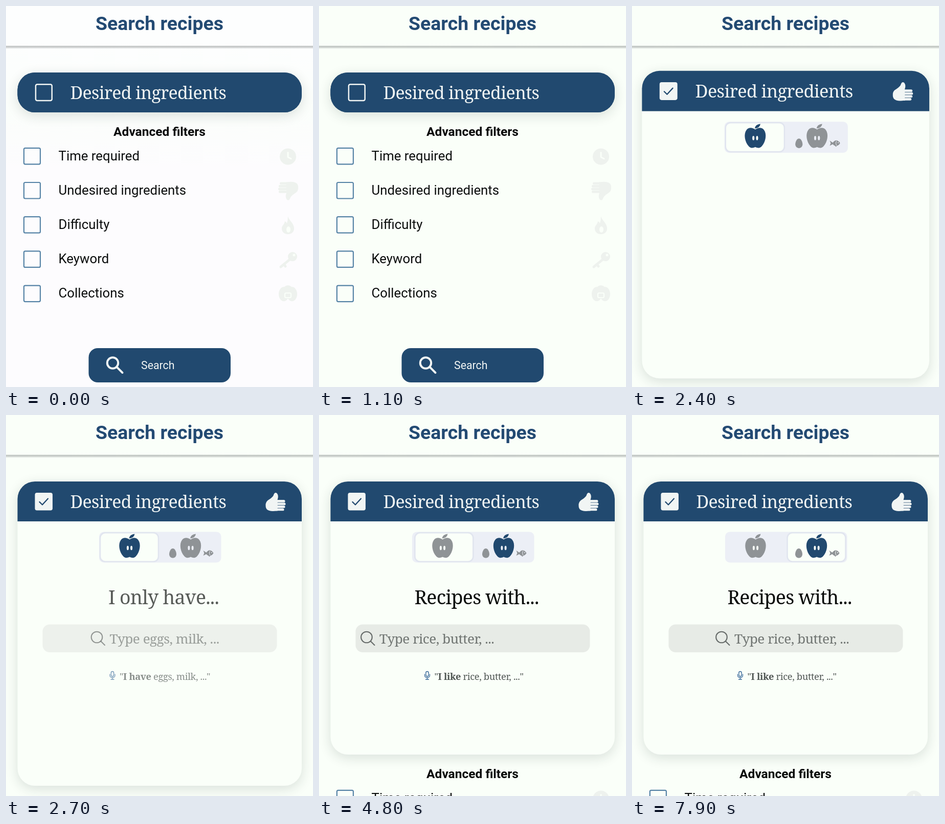
Recreate the animation shown at these times as an HTML page with a canvas. Size 600 px wide and 745 px high, loop 8 s.

```html
<!DOCTYPE html>
<html lang="en">
<head>
<meta charset="utf-8">
<title>Search recipes</title>
<style>
html, body { margin: 0; width: 100%; height: 100%; overflow: hidden; background: #fafff9; }
canvas { display: block; width: 600px; height: 745px; }
</style>
</head>
<body>
<canvas id="stage"></canvas>
<script>
const W = 600, H = 745, LOOP = 8000;
const NAVY = '#21496f', PAPER = '#fafff9', GREY = '#8f9396', LIGHT = '#f1f5f4', GHOST = '#eef2ee';
const SANS = 'Roboto, Arial, sans-serif', SERIF = '"Noto Serif", "Liberation Serif", serif';

// Moments in ms
const OPEN = 2000, GROWN = 2350, SHRUNK = 2700, SWITCH = 4775;

const canvas = document.getElementById('stage');
const ctx = canvas.getContext('2d');
const dpr = window.devicePixelRatio || 1;
canvas.width = W * dpr;
canvas.height = H * dpr;

const clamp = v => Math.min(1, Math.max(0, v));
const span = (t, from, to) => clamp((t - from) / (to - from));
const easeOut = p => 1 - (1 - p) ** 3;
const easeInOut = p => p * p * (3 - 2 * p);
const mix = (a, b, p) => a + (b - a) * p;

function group(draw, x = 0, y = 0, scale = 1) {
  ctx.save();
  ctx.translate(x, y);
  ctx.scale(scale, scale);
  draw();
  ctx.restore();
}

function box(x, y, w, h, r, fill, stroke, width = 2) {
  ctx.beginPath();
  ctx.roundRect(x, y, w, h, r);
  if (fill) { ctx.fillStyle = fill; ctx.fill(); }
  if (stroke) { ctx.strokeStyle = stroke; ctx.lineWidth = width; ctx.stroke(); }
}

function ellipse(x, y, rx, ry, fill) {
  ctx.beginPath();
  ctx.ellipse(x, y, rx, ry, 0, 0, Math.PI * 2);
  ctx.fillStyle = fill;
  ctx.fill();
}

function line(d, color, width) {
  ctx.strokeStyle = color;
  ctx.lineWidth = width;
  ctx.lineCap = ctx.lineJoin = 'round';
  ctx.stroke(new Path2D(d));
}

function shape(d, color) {
  ctx.fillStyle = color;
  ctx.fill(new Path2D(d));
}

// Draws text and returns the x where it ends
function text(str, x, y, size, color, { family = SANS, weight = 400, align = 'left' } = {}) {
  ctx.font = `${weight} ${size}px ${family}`;
  ctx.letterSpacing = family === SERIF ? `${-0.02 * size}px` : '0px';
  ctx.textAlign = align;
  ctx.fillStyle = color;
  ctx.fillText(str, x, y);
  return x + ctx.measureText(str).width;
}
const serif = (str, x, y, size, color, opts) => text(str, x, y, size, color, { family: SERIF, ...opts });

function magnifier(x, y, r, reach, color, width) {
  ctx.beginPath();
  ctx.arc(x, y, r, 0, Math.PI * 2);
  ctx.strokeStyle = color;
  ctx.lineWidth = width;
  ctx.stroke();
  const k = r * 0.72;
  line(`M${x + k} ${y + k}L${x + reach} ${y + reach}`, color, width);
}

function thumb(color, gap) {
  shape('M-20 8Q-21 -1 -13 -5Q-5 -10 -4 -15Q-2 -20 2 -17Q6 -12 3 -4L3 17Q-7 19 -13 17Q-20 15 -20 8Z', color);
  [[18, -4], [19, 1.5], [18, 7], [16, 12.5]].forEach(([end, y]) => {
    box(-2, y, end + 2, 5, 2.5, color);
    line(`M4 ${y + 5.2}H${end - 2}`, gap, 0.7);
  });
}

function apple(color, back) {
  shape('M0 -14C5 -18 13 -19 17 -13C23 -5 20 10 13 18C9 23 5 22 0 20C-5 22 -9 23 -13 18C-20 10 -23 -5 -17 -13C-13 -19 -5 -18 0 -14Z', color);
  shape('M-1 -16Q0 -24 10 -25Q9 -17 -1 -16Z', color);
  ellipse(-3.6, 2.5, 2, 4.2, back);
  ellipse(3.6, 2.5, 2, 4.2, back);
}

function egg(x, y) {
  shape(`M${x} ${y - 9}C${x + 5} ${y - 9} ${x + 7} ${y - 1} ${x + 7} ${y + 2}C${x + 7} ${y + 12} ${x - 7} ${y + 12} ${x - 7} ${y + 2}C${x - 7} ${y - 1} ${x - 5} ${y - 9} ${x} ${y - 9}Z`, GREY);
}

function fish(back) {
  shape('M-10 -5L-4 -1Q0 -7 5 -5Q9 -3 10 0Q8 4 4 5L2 7L0 5Q-3 4 -4 2L-10 5L-8 0Z', GREY);
  line('M3 -4Q1 0 3 4', back, 1);
  ellipse(6.4, -1, 1, 1, back);
}

const filterIcons = [
  () => {
    ellipse(0, 0, 16, 16, GHOST);
    line('M0 -8V1L6 4', PAPER, 3);
  },
  () => { ctx.rotate(Math.PI); thumb(GHOST, PAPER); },
  () => {
    shape('M0 -18C2 -9 12 -5 12 6C12 21 -12 21 -12 6C-12 0 -7 -1 -6 -8Q-3 -7 -2 -4Q0 -10 0 -18Z', GHOST);
    ellipse(1, 8, 4, 6, PAPER);
  },
  () => {
    ellipse(9, -6, 9, 9, GHOST);
    ellipse(12, -9, 2.5, 2.5, PAPER);
    line('M3 0L-14 14M-8 9L-5 13', GHOST, 5);
  },
  () => {
    ellipse(-8, 0, 10, 14, GHOST);
    ellipse(8, 0, 10, 14, GHOST);
    ellipse(0, -4, 11, 13, GHOST);
    box(-6, -2, 12, 9, 2, null, PAPER, 2);
  }
];

function drawTopBar() {
  text('Search recipes', 300, 46.5, 37.4, '#234a73', { weight: 700, align: 'center' });
  const g = ctx.createLinearGradient(0, 77, 0, 84);
  g.addColorStop(0, 'rgba(120,125,125,0)');
  g.addColorStop(0.3, 'rgba(120,125,125,.5)');
  g.addColorStop(1, 'rgba(120,125,125,0)');
  ctx.fillStyle = g;
  ctx.fillRect(0, 77, W, 7);
}

function drawFilters() {
  text('Advanced filters', 300, 253.5, 24.5, '#060707', { weight: 700, align: 'center' });
  ['Time required', 'Undesired ingredients', 'Difficulty', 'Keyword', 'Collections'].forEach((label, i) => {
    const y = 293.5 + i * 67.2;
    box(35, y - 15.7, 32, 31.5, 2.5, null, '#5683a6', 2.2);
    text(label, 102.5, y + 8, 25.8, '#0c0e0e');
    group(filterIcons[i], 551, y + 1);
  });
  box(161.5, 669, 277.5, 67, 18, NAVY);
  magnifier(208.5, 698, 10.7, 19, LIGHT, 4);
  text('Search', 264, 709.5, 21.3, LIGHT);
}

function drawToggle(t) {
  const second = t >= SWITCH;
  const slide = easeInOut(span(t, SWITCH, SWITCH + 260));
  const track = '#eceff6';
  box(182, 228.5, 238.5, 60, 9, track);
  box(mix(184, 303.5, slide), 230.3, 114, 56.4, 10, PAPER, '#e1e5ef', 2.6);
  group(() => apple(second ? GREY : NAVY, PAPER), 241.5, 257.5);
  group(() => apple(second ? NAVY : GREY, slide > 0.5 ? PAPER : track), 361, 257.5);
  egg(326, 270);
  group(() => fish(slide > 0.5 ? PAPER : track), 395.5, 270);
}

function drawMic(x) {
  box(x - 2.6, 501.5, 5.2, 9.5, 2.6, null, '#39699a', 1.4);
  line(`M${x - 5} 507V509Q${x - 5} 513.5 ${x} 513.5Q${x + 5} 513.5 ${x + 5} 509V507M${x} 513.5V517M${x - 3} 517H${x + 3}`, '#39699a', 1.3);
}

function drawPrompt(t) {
  const second = t >= SWITCH;
  const p = second
    ? { title: 'Recipes with...', hint: 'Type rice, butter, ...', verb: 'I like', rest: ' rice, butter, ..."', hintX: 200, micX: 211.5 }
    : { title: 'I only have...', hint: 'Type eggs, milk, ...', verb: 'I have', rest: ' eggs, milk, ..."', hintX: 202.5, micX: 208 };
  serif(p.title, 308, 370, 37.5, '#080a09', { align: 'center' });
  box(71.5, 409.5, 458, 54.5, 14, '#e7ebe6');
  const x = p.hintX - (second ? 82 * (1 - easeInOut(span(t, SWITCH + 30, SWITCH + 330))) : 0);
  magnifier(x - 25, 434.5, 10.8, 15.5, '#666b69', 2.1);
  serif(p.hint, x, 447, 26.2, '#707572');
  drawMic(p.micX);
  const ink = '#515755';
  let end = serif('"', p.micX + 14, 517.5, 18.3, ink);
  end = serif(p.verb, end, 517.5, 18.3, ink, { weight: 700 });
  serif(p.rest, end, 517.5, 18.3, ink);
}

function drawCard(t, bottom) {
  const open = t >= OPEN;
  const h = bottom - 130;
  ctx.shadowColor = 'rgba(30,50,40,.15)';
  ctx.shadowBlur = 24 * dpr;
  ctx.shadowOffsetY = 6 * dpr;
  box(22.5, 130, 555.5, h, 34, open ? PAPER : NAVY);
  ctx.shadowColor = 'transparent';

  ctx.beginPath();
  ctx.roundRect(22.5, 130, 555.5, h, 34);
  ctx.clip();
  ctx.fillStyle = NAVY;
  ctx.fillRect(20, 128, 560, 80);
  if (open) {
    box(56.5, 152, 34.5, 34.5, 4, LIGHT);
    line('M65.5 170L71 175.5L82 163.5', NAVY, 2.3);
    group(() => thumb(LIGHT, NAVY), 527.5, 170);
    drawToggle(t);
    ctx.globalAlpha = span(t, 2500, 2800);
    drawPrompt(t);
  } else {
    box(58, 153.3, 31.8, 31.8, 3, null, LIGHT, 2.5);
  }
  ctx.globalAlpha = 1;
  serif('Desired ingredients', 125.5, 182, 34, LIGHT);
}

function drawBackground(t) {
  ctx.fillStyle = PAPER;
  ctx.fillRect(0, 0, W, H);
  const tint = 1 - span(t, 0, 600);
  if (tint <= 0) return;
  const g = ctx.createLinearGradient(0, 80, 0, 320);
  g.addColorStop(0, '#fdfefe');
  g.addColorStop(0.5, '#fbfefb');
  g.addColorStop(1, '#fdfcfe');
  ctx.globalAlpha = tint;
  ctx.fillStyle = g;
  ctx.fillRect(0, 0, W, H);
  ctx.globalAlpha = 1;
}

function draw(t) {
  ctx.setTransform(dpr, 0, 0, dpr, 0, 0);
  drawBackground(t);
  const bottom = t >= SWITCH ? 664 : mix(208, 725, easeOut(span(t, OPEN, GROWN)));
  group(drawFilters, 0, bottom - 208);

  const swell = easeInOut(span(t, OPEN, GROWN)) * (1 - easeInOut(span(t, GROWN, SHRUNK)));
  const scale = 1 + 0.0115 * swell;
  const middle = (130 + bottom) / 2;
  group(() => drawCard(t, bottom), 300 * (1 - scale), middle * (1 - scale), scale);
  drawTopBar();
}

const start = performance.now();
function tick() {
  draw((performance.now() - start) % LOOP);
  requestAnimationFrame(tick);
}
tick();
</script>
</body>
</html>
```
